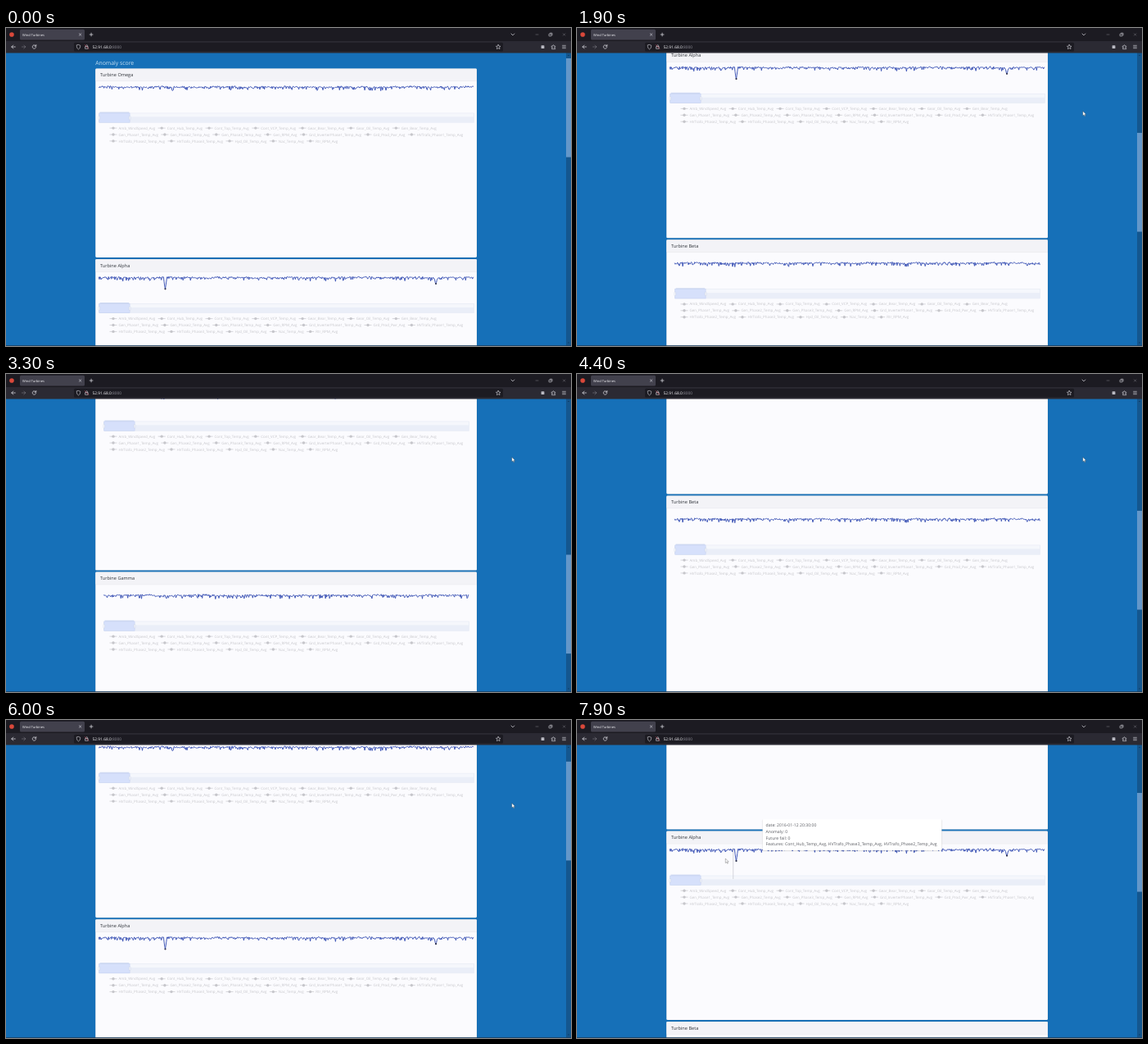
Recreate the animation shown at these times as an HTML page. Size 690x388 px, loop 8000 ms.

```html
<!DOCTYPE html>
<html lang="en">
<head>
<meta charset="utf-8">
<title>Wind Turbines</title>
<style>
html, body { margin: 0; width: 100%; height: 100%; overflow: hidden; background: #1670b8; }
svg { display: block; width: 100vw; height: 100vh; }
text { font-family: "Open Sans", "Noto Sans", sans-serif; text-rendering: geometricPrecision; white-space: pre; }
.icon { fill: none; stroke: #e6e6ec; stroke-width: .7; stroke-linecap: round; stroke-linejoin: round; }
.thin { stroke-width: .55; }
.dim { stroke-width: .55; opacity: .45; }
.series { fill: none; stroke: #4259b8; stroke-width: 1; stroke-linejoin: bevel; }
</style>
</head>
<body>
<svg id="stage" viewBox="0 0 690 388" preserveAspectRatio="none"></svg>
<script>
const LOOP = 8000, STEP = 100, NOTCH = 36.6;

const LEGEND = [
  'Amb_WindSpeed Cont_Hub_Temp Cont_Top_Temp Cont_VCP_Temp Gear_Bear_Temp Gear_Oil_Temp Gen_Bear_Temp',
  'Gen_Phase1_Temp Gen_Phase2_Temp Gen_Phase3_Temp Gen_RPM Grd_InverterPhase1_Temp Grd_Prod_Pwr HVTrafo_Phase1_Temp',
  'HVTrafo_Phase2_Temp HVTrafo_Phase3_Temp Hyd_Oil_Temp Nac_Temp Rtr_RPM'
].map(row => row.split(' ').map(name => name + '_Avg'));

const CARDS = [
  { name: 'Turbine Omega', h: 230.5, pad: 0, dips: [] },
  { name: 'Turbine Alpha', h: 230.5, pad: 0, dips: [[194.5, 15.5], [525, 9.2]] },
  { name: 'Turbine Beta', h: 242, pad: 6, dips: [] },
  { name: 'Turbine Gamma', h: 242, pad: 6, dips: [] }
];

// wheel turns: start, end, notches, ease-out power
const TURNS = [
  [1200, 1900, 7, 1.2], [2200, 3000, 8, 1.2], [3200, 3600, -3, 1.2], [4000, 4400, -2, 1.2],
  [4800, 5600, -7, 1.2], [5800, 6200, -3, 1.5], [6500, 7200, 4, .7]
];

const progress = (t, a, b) => Math.min(1, Math.max(0, (t - a) / (b - a)));
const mix = (a, b, p) => a + (b - a) * p;
const smooth = p => p * p * (3 - 2 * p);

const scrollAt = t => TURNS.reduce((sum, [a, b, n, power]) =>
  sum + NOTCH * n * (1 - Math.pow(1 - progress(t, a, b), power)), 0);

function pointerAt(t) {
  const enter = smooth(progress(t, 300, 600)), cross = smooth(progress(t, 7100, 7900));
  return [mix(mix(692, 617.8, enter), 181.3, cross), mix(mix(106, 101.5, enter), 169, cross)];
}

function random(seed) {
  return () => {
    seed = (seed * 16807) % 2147483647;
    return seed / 2147483647;
  };
}

const rect = (x, y, w, h, fill, more = '') =>
  `<rect x="${x}" y="${y}" width="${w}" height="${h}" fill="${fill}" ${more}/>`;
const text = (x, y, size, fill, str, more = '') =>
  `<text x="${x}" y="${y}" font-size="${size}" fill="${fill}" ${more}>${str}</text>`;
const icon = (d, kind = '') => `<path class="icon ${kind}" d="${d}"/>`;

const pen = document.createElement('canvas').getContext('2d');
pen.font = '100px "Open Sans", "Noto Sans", sans-serif';
const widthOf = (str, size) => pen.measureText(str).width * size / 100;

// a ragged band that hangs from a slowly waving ceiling
function series(x0, x1, top, seed, dips) {
  const rnd = random(seed);
  const points = [];
  for (let x = x0; x <= x1; x += .7) {
    const wave = .6 + .5 * Math.sin(x / 7 + seed) * Math.sin(x / 17);
    let v = wave + rnd() * 1.7 + Math.pow(rnd(), 5) * 4;
    for (const [dx, depth] of dips) {
      const off = Math.abs(x - dx);
      if (off < 1.6) v += (depth - v) * Math.pow(1 - off / 1.6, .6);
    }
    points.push(x.toFixed(1) + ' ' + (top + v).toFixed(2));
  }
  return `<path class="series" d="M${points.join('L')}"/>`;
}

function slider(x0, x1, y) {
  const w = 37.3, h = 11.3;
  const grip = x => rect(x - .8, y + 3.4, 1.6, 4.6, '#fff', 'rx=".6" stroke="#b9c4de" stroke-width=".4"');
  return rect(x0, y, x1 - x0, h, '#f5f7fc', 'stroke="#e0e5f1" stroke-width=".5"') +
    rect(x0, y + 4.5, x1 - x0, h - 4.5, '#eaeef8') +
    rect(x0, y, w, h, '#d6e0fb', 'stroke="#c2cff0" stroke-width=".5"') +
    rect(x0 + .8, y - 1.4, w - 1.6, 1.6, '#cdd8f2') +
    grip(x0) + grip(x0 + w);
}

function legend(y) {
  return LEGEND.map((row, r) => {
    const cy = y + r * 7.9;
    let x = 137.5;
    return row.map(label => {
      const item = `<path d="M${x - 11} ${cy}h9" stroke="#cbcbd0" stroke-width=".75"/>` +
        `<circle cx="${x - 6.5}" cy="${cy}" r="1.7" fill="#c6c6cb"/>` +
        text(x, cy + 1.6, 4.45, '#c6c6cb', label);
      x += widthOf(label, 4.45) + 14.4;
      return item;
    }).join('');
  }).join('');
}

function card({ name, h, pad, dips }, i, top) {
  const x0 = 113.3 + pad, x1 = 571.3 - pad;
  const dots = dips.map(([x, d]) => `<circle cx="${x}" cy="${20.8 + d}" r="1.1" fill="#2b2f4c"/>`).join('');
  return `<g transform="translate(0 ${top})">` +
    rect(109.2, 0, 465.8, h, '#fbfbfe', 'rx="1.4"') +
    rect(109.4, .2, 465.4, 15, '#f3f3f7', 'rx="1.2"') +
    rect(109.2, 15.2, 465.8, .4, '#dedee4') +
    rect(109.4, .2, 465.4, h - .4, 'none', 'rx="1.3" stroke="#000" stroke-opacity=".13" stroke-width=".4"') +
    text(115, 9.5, 5.6, '#33373d', name) +
    series(x0, x1, 20.8 + pad, 911 + i * 7727, dips) + dots +
    slider(x0 + .5, x1 + .3, 54.4 + pad) +
    legend(72.6 + pad) + '</g>';
}

function cards() {
  let top = 49.5;
  return CARDS.map((c, i) => {
    const svg = card(c, i, top);
    top += c.h + 2;
    return svg;
  }).join('');
}

function browser() {
  return rect(0, 0, 690, 16, '#1c1b22') + rect(0, 16, 690, 14.5, '#2b2a33') +
    rect(17, 1.8, 79, 12.6, '#42414d', 'rx="1.5"') +
    '<circle cx="7" cy="8" r="2.8" fill="#d9483a"/>' +
    text(20, 9.6, 4, '#f4f4f8', 'Wind Turbines') +
    icon('M89.3 6.7l2.6 2.6m0-2.6l-2.6 2.6', 'thin') +
    icon('M102.2 8h3.8M104.1 6.1v3.8') +
    icon('M617 7l1.9 1.9L620.8 7') +
    icon('M647 8h3', 'dim') +
    icon('M663.4 7.2h2.6v2.6h-2.6zM664.4 6.2h2.6v2.6', 'thin') +
    icon('M680.4 6.8l2.4 2.4m0-2.4l-2.4 2.4', 'dim') +
    rect(83, 17.8, 524, 10.6, '#1c1b22', 'rx="1.5"') +
    icon('M11.3 23H6.8M8.8 21l-2 2 2 2') +
    icon('M19.4 23h4.4M21.8 21l2 2-2 2', 'dim') +
    icon('M36.4 21.9a2.2 2.2 0 1 0 .2 1.7M36.8 20.5v1.7h-1.7') +
    icon('M88.5 20.4l2.2.8c0 2.6-.6 3.8-2.2 4.8-1.6-1-2.2-2.2-2.2-4.8z', 'thin') +
    icon('M97 22.7h3.2v2.6H97zM97.6 22.7v-1a1 1 0 0 1 2 0v1', 'thin') +
    '<path d="M96.2 20.4l4.9 5.2" stroke="#e0566a" stroke-width=".6"/>' +
    text(105.5, 24.8, 4.85, '#fbfbfe', '52.91.68.0<tspan fill="#8f8e98">:8000</tspan>') +
    icon('M601.2 20.3l.8 1.8 2 .2-1.5 1.3.5 2-1.8-1-1.8 1 .5-2-1.5-1.3 2-.2z', 'thin') +
    rect(653.6, 21.2, 3.8, 3.8, '#b9b9c2', 'rx=".6"') +
    icon('M666.6 22h1.2c-.5-1.7 1.8-1.7 1.4 0h1.5v1.3c-1.6-.4-1.6 1.8 0 1.4v1h-4.1v-1.2c1.4.3 1.4-1.5 0-1.2z', 'thin') +
    icon('M679.6 21.3h3.8m-3.8 1.7h3.8m-3.8 1.7h3.8', 'thin');
}

const TIP_TEXT = ['', 'Anomaly: 0', 'Future fail: 0',
  'Features: Cont_Hub_Temp_Avg, HVTrafo_Phase3_Temp_Avg, HVTrafo_Phase2_Temp_Avg'];

const tooltip = () =>
  rect(-.8, .2, 220.4, 39.2, '#000', 'rx="2" opacity=".05"') +
  rect(-.3, .2, 219.5, 38.4, '#000', 'rx="1.7" opacity=".08"') +
  rect(0, 0, 218.8, 38, '#fff', 'rx="1.4"') +
  TIP_TEXT.map((str, n) => text(4, 9.4 + n * 7.65, 5.13, '#5b5d63', str, n ? '' : 'id="date"')).join('');

const $ = id => document.getElementById(id);
const move = (id, x, y) => $(id).setAttribute('transform', `translate(${x} ${y})`);
const show = (id, on) => $(id).setAttribute('visibility', on ? 'visible' : 'hidden');

$('stage').innerHTML =
  rect(0, 0, 690, 388, '#1670b8') +
  '<g id="page">' + text(109.2, 45.4, 6.85, '#c9e0f2', 'Anomaly score') + cards() + '</g>' +
  '<path id="axis" stroke="#b3b5bd" stroke-width=".5"/>' +
  `<g id="tip">${tooltip()}</g>` +
  rect(684, 30, 6, 358, '#14578f') +
  rect(684, 37, 6, 120.6, '#6497c9', 'id="thumb"') +
  '<path d="M685.8 34l1.2-1.4 1.2 1.4zM685.8 383.6l1.2 1.4 1.2-1.4z" fill="#0d3c68"/>' +
  rect(0, 387.2, 690, .8, '#1c3f60') +
  browser() +
  '<path id="pointer" d="M0 0v5.4l1.3-1.1.9 1.9.9-.4-.9-1.9h1.7z" fill="#fff" stroke="#222" stroke-width=".3"/>';

function dateAt(x) {
  const minutes = Math.round((x - 190.7) * 22) * 10;
  const d = new Date(Date.UTC(2016, 0, 12, 20, 20) + minutes * 60000);
  return d.toISOString().slice(0, 19).replace('T', ' ');
}

function draw(t) {
  const s = scrollAt(t);
  move('page', 0, -s);
  $('thumb').setAttribute('y', 37 + s * .355);

  move('pointer', ...pointerAt(t));
  show('pointer', t >= 400);

  // the axis line and the tooltip trail behind the pointer
  const hover = t >= 7500;
  show('tip', hover);
  show('axis', hover);
  if (!hover) return;
  const [line] = pointerAt(t - 70), [x, y] = pointerAt(t - 150);
  move('tip', Math.min(357, x + 5), y - 41.7);
  $('axis').setAttribute('d', `M${line} 156V194`);
  $('date').textContent = 'date: ' + dateAt(line);
}

const start = performance.now();
function tick() {
  const t = (performance.now() - start) % LOOP;
  draw(Math.floor(t / STEP) * STEP);
  requestAnimationFrame(tick);
}
draw(0);
requestAnimationFrame(tick);
</script>
</body>
</html>
```
